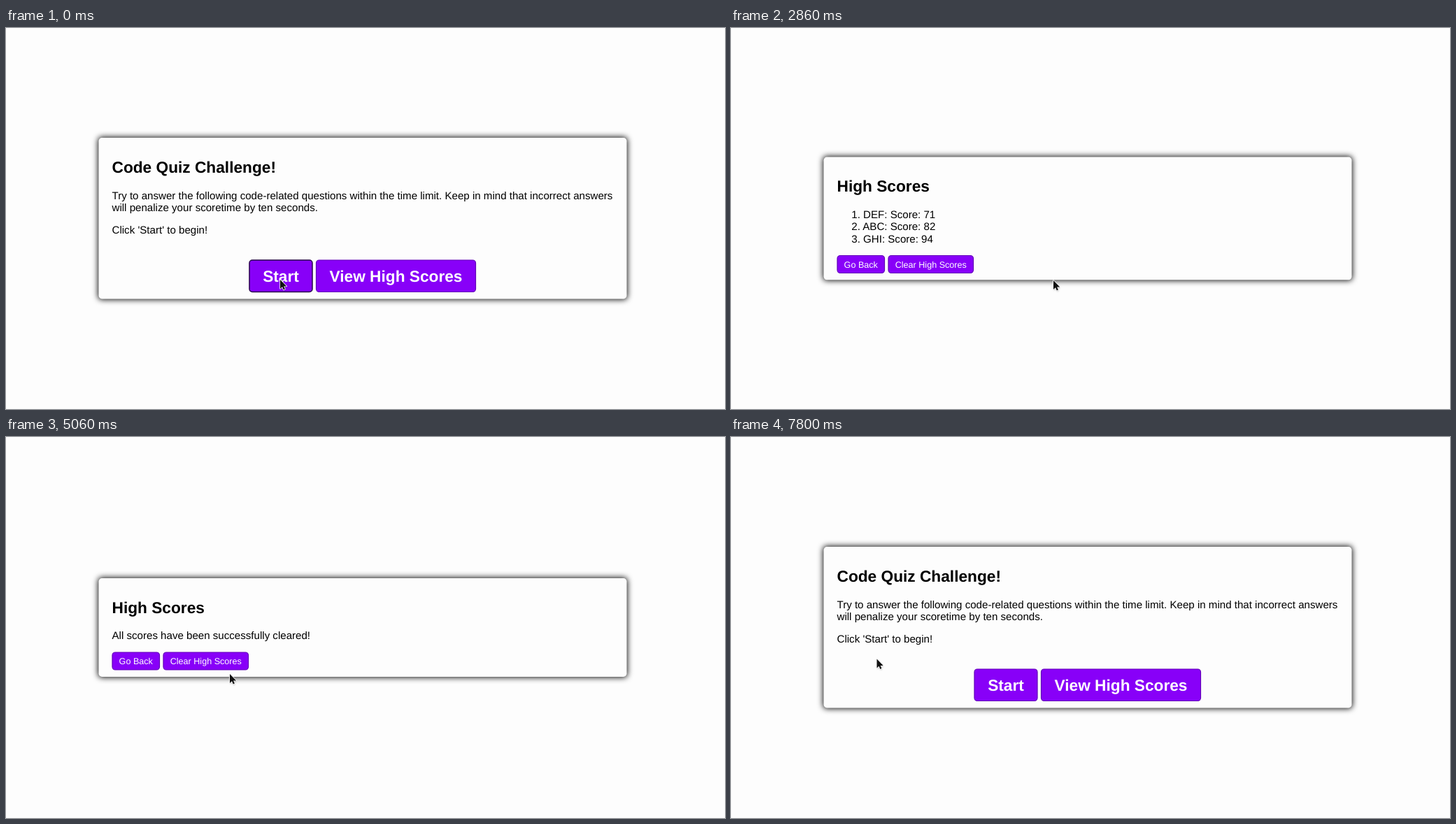
An HTML page that plays this animation: 1028x545 px, repeating every 8 s.

```html
<!DOCTYPE html>
<html lang="en">
<head>
<meta charset="utf-8">
<title>Code quiz</title>
<style>
  html, body { margin: 0; width: 100%; height: 100%; overflow: hidden; background: #fdfdfd; }
  svg { display: block; position: absolute; left: 0; top: 0; }
  text { font: 15.1px "Liberation Sans", Arial, sans-serif; text-rendering: geometricPrecision; white-space: pre; }
  .title, .big text { font-size: 22.7px; font-weight: bold; }
  .button rect { fill: #8800f8; stroke: #6200b8; stroke-width: 1.2; }
  .button.hover rect { stroke: #26004a; stroke-width: 1.5; }
  .button text { fill: #fff; text-anchor: middle; }
  .small text { font-size: 12.6px; }
  .card { fill: #fdfdfd; }
  .shadow { fill: #000; filter: url(#blur); }
</style>
</head>
<body>
<svg id="stage" width="1028" height="545" viewBox="0 0 1028 545">
  <defs>
    <filter id="blur" x="-5%" y="-20%" width="110%" height="140%">
      <feGaussianBlur stdDeviation="4.4"/>
    </filter>
    <filter id="soft" x="-60%" y="-60%" width="220%" height="220%">
      <feGaussianBlur stdDeviation="1"/>
    </filter>
  </defs>
  <g id="pages"></g>
  <g id="cursor">
    <path d="M0 0V13L3 10.2L4.8 14.4L6.9 13.5L5.1 9.5H9.2Z" transform="translate(.5 1.4)" opacity=".35" filter="url(#soft)"/>
    <path d="M0 0V13L3 10.2L4.8 14.4L6.9 13.5L5.1 9.5H9.2Z" fill="#111" stroke="#fff" stroke-width="1.6" paint-order="stroke" stroke-linejoin="round"/>
  </g>
</svg>
<script>
const LOOP = 8000, TICK = 1000 / 15;
const pagesRoot = document.getElementById('pages');
const cursor = document.getElementById('cursor');

function add(parent, tag, attrs, content = '') {
  const node = document.createElementNS('http://www.w3.org/2000/svg', tag);
  for (const key in attrs) node.setAttribute(key, attrs[key]);
  node.textContent = content;
  return parent.appendChild(node);
}

// Lines are [x, baseline, text]; buttons are [x, y, width, height, label].
function makePage(top, bottom, title, lines, buttons, size) {
  const root = add(pagesRoot, 'g', {});
  const box = { x: 132.5, y: top, width: 755, height: bottom - top, rx: 4.7 };
  add(root, 'rect', { ...box, x: 131.8, y: top - .7, width: 756.4, height: bottom - top + 1.4, class: 'shadow' });
  add(root, 'rect', { ...box, class: 'card' });
  add(root, 'text', { x: 151.5, y: top + 49.7, class: 'title' }, title);
  for (const [x, y, line] of lines) add(root, 'text', { x, y }, line);
  const hits = buttons.map(([x, y, w, h, label]) => {
    const node = add(root, 'g', { class: 'button ' + size });
    add(node, 'rect', { x: x + .5, y: y + .5, width: w - 1, height: h - 1, rx: 4.2 });
    const drop = size === 'big' ? 7.9 : 4.5;
    add(node, 'text', { x: x + w / 2, y: y + h / 2 + drop }, label);
    return { node, x, y, w, h };
  });
  return { root, hits };
}

const scoreButtons = y => [
  [151.5, y, 68.5, 26, 'Go Back'],
  [224.5, y, 122.5, 26, 'Clear High Scores']
];

const home = makePage(157, 387.5, 'Code Quiz Challenge!', [
  [151.5, 244.6, 'Try to answer the following code-related questions within the time limit. Keep in mind that incorrect answers'],
  [151.5, 262, 'will penalize your scoretime by ten seconds.'],
  [151.5, 294.2, "Click 'Start' to begin!"]
], [
  [347.5, 331.5, 91, 46.5, 'Start'],
  [443, 331.5, 229, 46.5, 'View High Scores']
], 'big');

const scores = makePage(184.5, 360.3, 'High Scores', [
  [172.3, 272, '1. DEF: Score: 71'],
  [172.3, 289.4, '2. ABC: Score: 82'],
  [172.3, 306.8, '3. GHI: Score: 94']
], scoreButtons(325), 'small');

const cleared = makePage(202, 343, 'High Scores', [
  [151.5, 289.4, 'All scores have been successfully cleared!']
], scoreButtons(307.5), 'small');

const pages = [home, scores, cleared];
const schedule = [[0, home], [2133, scores], [4800, cleared], [7533, home]];

// Pointer path: [ms, x, y]
const path = [
  [0, 392, 360], [130, 396, 360], [400, 428, 361], [700, 458, 362], [1000, 467, 362],
  [1733, 466, 361], [2800, 466, 361], [2867, 461, 361], [3667, 349, 347],
  [3733, 339, 344], [3867, 325, 340], [4000, 320, 339], [6200, 320, 339],
  [6467, 312, 336], [6600, 297, 333], [6667, 288, 331.5], [7200, 213, 319],
  [7333, 208.5, 317.5], [LOOP, 208.5, 317.5]
];

function pointerAt(t) {
  const i = path.findIndex(key => key[0] > t);
  const [t0, x0, y0] = path[i - 1], [t1, x1, y1] = path[i];
  const k = (t - t0) / (t1 - t0);
  return [x0 + (x1 - x0) * k, y0 + (y1 - y0) * k];
}

function render(now) {
  const t = Math.min(LOOP - 1, Math.floor((now % LOOP + 7) / TICK) * TICK + .5);
  const [x, y] = pointerAt(t);
  const current = schedule.filter(([start]) => start <= t).pop()[1];
  for (const page of pages) page.root.setAttribute('display', page === current ? 'inline' : 'none');
  for (const { node, x: left, y: top, w, h } of current.hits) {
    node.classList.toggle('hover', x >= left && x <= left + w && y >= top && y <= top + h);
  }
  cursor.setAttribute('transform', `translate(${x} ${y})`);
}

const began = performance.now();
function frame() {
  render(performance.now() - began);
  requestAnimationFrame(frame);
}
frame();
</script>
</body>
</html>
```
